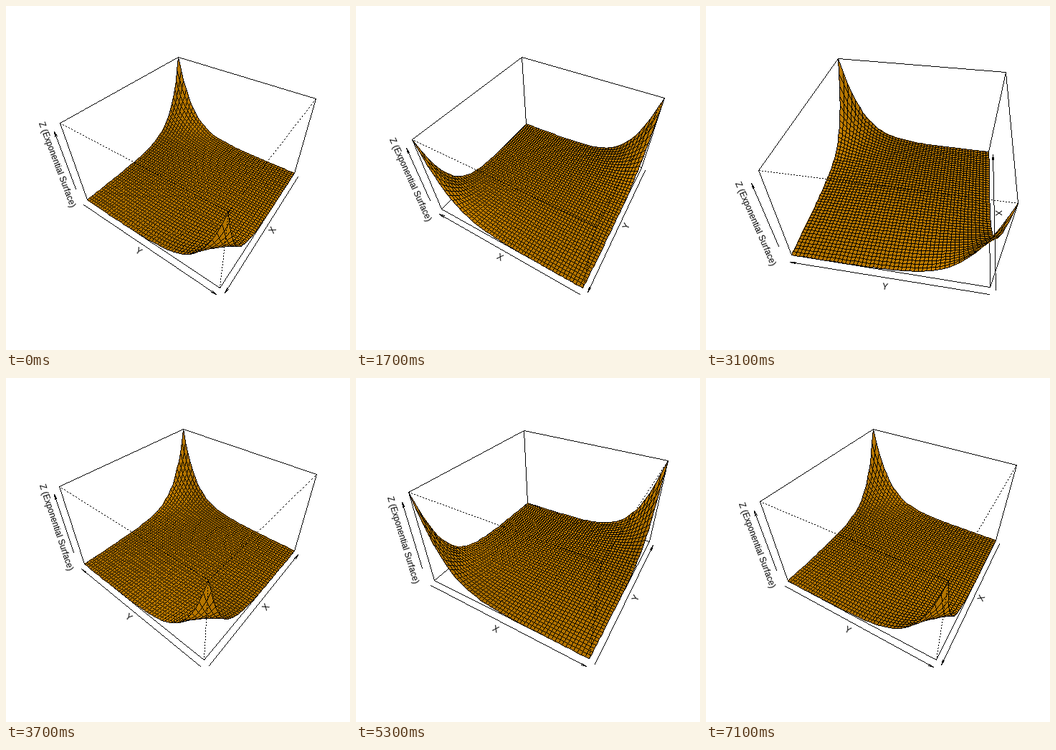
Animation, 480 px wide and 480 px high, one loop 7.2 s. Source, as a matplotlib script:

```python
import itertools

import numpy as np
import matplotlib.pyplot as plt
from matplotlib.animation import FuncAnimation

SIZE, DPI = 480, 96
FRAMES, INTERVAL = 72, 100

HALF = np.array([1, 1, 0.6])         # half sizes of the box
DIST = 2 + np.sqrt(3)                # eye distance
CENTER = np.array([254.4, 232.8])    # middle of the plot region
ROOM = np.array([390.72, 347.52]) / 1.08
CELLS = 49
PEAK = 4
TICK = 0.06
FONT = 12

CORNERS = np.array(list(itertools.product((-1, 1), repeat=3))) * HALF


def level(z):
    """Box height of a raw surface value."""
    low, top = np.exp(-PEAK), np.exp(PEAK)
    return HALF[2] * (2 * (z - low) / (top - low) - 1)


def make_facets():
    g = np.linspace(-1, 1, CELLS + 1)
    x, y = np.meshgrid(g, g, indexing="ij")
    p = np.stack([x, y, level(np.exp(PEAK * x * y))], axis=-1)
    a, b, c, d = p[:-1, :-1], p[1:, :-1], p[1:, 1:], p[:-1, 1:]
    normal = np.cross(b - d, c - a)
    normal /= np.linalg.norm(normal, axis=-1, keepdims=True)
    light = np.array([-1, 1, 0]) / np.sqrt(2)
    shade = np.sqrt(0.5 * (normal @ light + 1)).reshape(-1, 1)
    quads = np.stack([a, b, c, d], axis=2).reshape(-1, 4, 3)
    return quads, shade * np.array([255, 165, 0])


QUADS, COLORS = make_facets()
BASE = QUADS * [1, 1, 0]

# Palette: clear, black, then one colour per facet
CLEAR, BLACK, FIRST = 0, 1, 2
PALETTE = np.zeros((FIRST + len(QUADS), 4), dtype=np.uint8)
PALETTE[BLACK:, 3] = 255
PALETTE[FIRST:, :3] = np.round(COLORS)

# Bilinear weights that sample the inside of a quad
s, t = (w.ravel() for w in np.meshgrid(*[np.linspace(0, 1, 20)] * 2))
INSIDE = np.array([(1 - s) * (1 - t), s * (1 - t), s * t, (1 - s) * t],
                  dtype=np.float32)


class View:
    """Perspective view fitted into the plot region."""

    def __init__(self, theta, phi):
        t, f = np.radians([theta, phi])
        ct, st, cf, sf = np.cos(t), np.sin(t), np.cos(f), np.sin(f)
        self.axes = np.array([[ct, st, 0],
                              [-st * sf, ct * sf, cf],
                              [st * cf, -ct * cf, sf]])
        self.eye = DIST * self.axes[2]
        flat = self.project(CORNERS)
        low, top = flat.min(axis=0), flat.max(axis=0)
        self.scale = (ROOM / (top - low)).min()
        self.mid = (low + top) / 2

    def depth(self, p):
        return DIST - np.asarray(p) @ self.axes[2]

    def project(self, p):
        q = np.asarray(p) @ self.axes[:2].T
        return q * [1, -1] / self.depth(p)[..., None]

    def screen(self, p):
        return CENTER + (self.project(p) - self.mid) * self.scale

    def pixels(self, p):
        return np.floor(self.screen(p)).astype(int)


def cells(x, y):
    """Index of each pixel in the flat canvas."""
    return (np.floor(y + 0.5) * SIZE + np.floor(x + 0.5)).astype(np.int32)


def strokes(a, b):
    """Canvas cells of hard one-pixel lines from a to b."""
    span = b - a
    length = np.abs(span).max(axis=-1)[..., None]
    step = np.arange(length.max() + 1)
    part = np.minimum(step / np.maximum(length, 1), 1)
    x, y = (a[..., i, None] + span[..., i, None] * part for i in (0, 1))
    return cells(x, y)


def draw_facets(canvas, view):
    """Paint filled, outlined facets from back to front."""
    order = np.argsort(-view.depth(BASE).max(axis=1), kind="stable")
    quads = view.pixels(QUADS[order])
    x, y = np.moveaxis(quads.astype(np.float32), -1, 0)
    fill = cells(x @ INSIDE, y @ INSIDE)
    edges = strokes(quads, np.roll(quads, -1, axis=1)).reshape(len(quads), -1)
    ink = np.full((len(quads), fill.shape[1] + edges.shape[1]), BLACK)
    ink[:, :fill.shape[1]] = order[:, None] + FIRST
    canvas[np.hstack([fill, edges]).ravel()] = ink.ravel()


def box_edges(view):
    """Split the box edges into those behind and in front of the surface."""
    back, front = [], []
    for axis in range(3):
        others = [i for i in range(3) if i != axis]
        for signs in itertools.product((-1, 1), repeat=2):
            ends = np.zeros((2, 3))
            ends[:, axis] = -HALF[axis], HALF[axis]
            near = True
            for i, sign in zip(others, signs):
                ends[:, i] = sign * HALF[i]
                near = near and sign * view.eye[i] > HALF[i]
            (front if near else back).append(view.pixels(ends))
    return back, front


def arrow(start, tip):
    """Shaft and two thin barbs."""
    dx, dy = start - tip
    lines = [(start, tip)]
    for turn in (-10, 10):
        a = np.arctan2(dy, dx) + np.radians(turn)
        barb = tip + 7.2 * np.array([np.cos(a), np.sin(a)])
        lines.append((tip, np.round(barb).astype(int)))
    return lines


def axis_specs(view):
    """Axis number, its range, the edge it follows and its outward direction."""
    floor = CORNERS[CORNERS[:, 2] < 0]
    spots = view.screen(floor)
    lowest = floor[spots[:, 1].argmax()]
    left = floor[spots[:, 0].argmin()]
    sx, sy = lowest[:2]
    return [(0, (-1, 1), lowest, np.array([0, sy, -HALF[2]])),
            (1, (-1, 1), lowest, np.array([sx, 0, -HALF[2]])),
            (2, (level(10), level(50)), left, left * [1, 1, 0])]


def place_label(label, spot, start, tip):
    dx, dy = tip - start
    if dx < 0:
        dx, dy = -dx, -dy
    angle = np.arctan2(-dy, dx)
    drop = 0.53 * FONT
    label.set_position(spot + drop * np.array([np.sin(angle), np.cos(angle)]))
    label.set_rotation(np.degrees(angle))


fig = plt.figure(figsize=(SIZE / DPI, SIZE / DPI), dpi=DPI, facecolor="white")
ax = fig.add_axes([0, 0, 1, 1])
ax.axis("off")
picture = ax.imshow(np.zeros((SIZE, SIZE, 4), dtype=np.uint8), aspect="auto",
                    extent=(0, SIZE, SIZE, 0), interpolation="nearest",
                    zorder=2)
labels = [ax.text(0, 0, name, family="Liberation Sans",
                  fontsize=FONT * 72 / DPI, ha="center", va="baseline",
                  rotation_mode="anchor", zorder=1)
          for name in ("X", "Y", "Z (Exponential Surface)")]


def draw(frame):
    turn = 5 * (frame + 1)
    view = View(120 + turn, 40 + 5 * np.sin(np.radians(turn)))
    canvas = np.full(SIZE * SIZE, CLEAR)

    lines, front = box_edges(view)
    for axis, span, edge, out in axis_specs(view):
        ends = np.array([edge, edge], dtype=float)
        ends[:, axis] = span
        start, tip = view.pixels(ends + TICK * out)
        lines += arrow(start, tip)
        spot = view.screen(ends.mean(axis=0) + 2 * TICK * out)
        place_label(labels[axis], spot, start, tip)

    for a, b in lines:
        canvas[strokes(a, b)] = BLACK
    draw_facets(canvas, view)
    for a, b in front:
        dots = strokes(a, b)
        canvas[dots[np.arange(len(dots)) % 4 < 2]] = BLACK

    picture.set_data(PALETTE[canvas].reshape(SIZE, SIZE, 4))
    return [picture, *labels]


anim = FuncAnimation(fig, draw, frames=FRAMES, interval=INTERVAL,
                     repeat=True, repeat_delay=0, blit=False)
plt.show()
```
